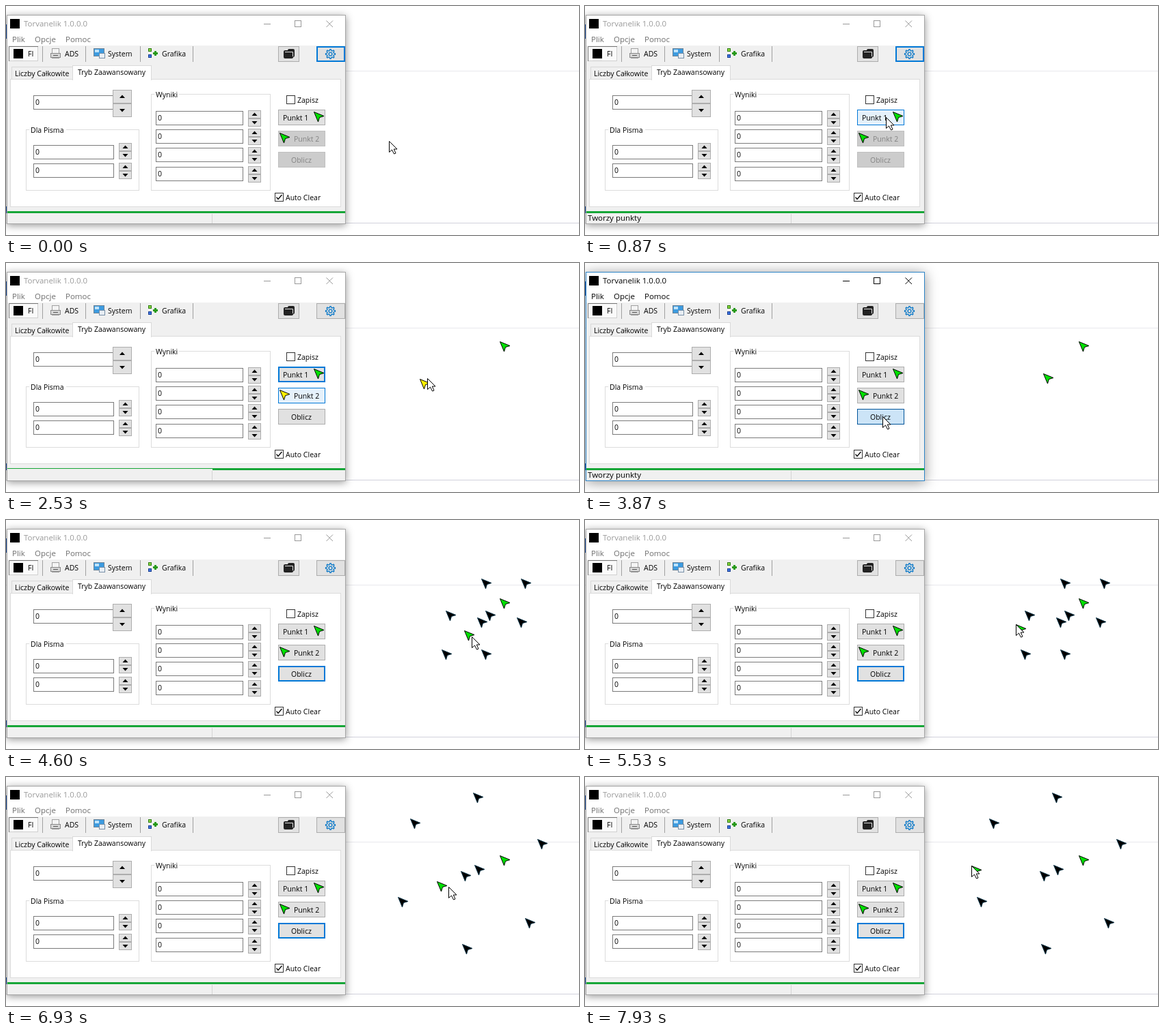
An HTML page with a canvas for the animation above (8 s loop, 838 by 336 pixels).

```html
<!DOCTYPE html>
<html lang="pl">
<head>
<meta charset="utf-8">
<style>
html, body { margin: 0; overflow: hidden; background: #fff; }
canvas { display: block; }
</style>
</head>
<body>
<canvas id="stage" width="838" height="336"></canvas>
<script>
const g = document.getElementById('stage').getContext('2d');
const LOOP = 8000, LAG = 35;
const BLUE = '#0078d7', GREEN = '#00e000', YELLOW = '#fff200', GREY = '#adadad';
const SMALL = '10.5px "Open Sans", "Noto Sans", sans-serif';
const LARGE = '11.5px "Open Sans", "Noto Sans", sans-serif';

// Places where the points are dropped, and when
const first = [722, 115], second = [670, 162], third = [630, 153], last = [565, 130];
const PICK1 = 930, DROP1 = 1470, PICK2 = 2130, DROP2 = 3200;
const PRESS1 = 3870, DONE1 = 4070, GRAB1 = 4800, LEAVE = 5800;
const PRESS2 = 6330, DONE2 = 6530, GRAB2 = 7130;

// Mouse moves: start, end, goal
const home = [560, 198];
const moves = [
  [0, 870, [440, 163]],
  [PICK1, 1400, first],
  [DROP1, 1730, [513, 156]],
  [1730, 2060, [430, 193]],
  [PICK2, 2890, second],
  [DROP2, 3730, [435, 225]],
  [DONE1, 4600, [681, 171]],
  [GRAB1, 5460, third],
  [LEAVE, 6270, [424, 226]],
  [DONE2, 6930, [647, 161]],
  [GRAB2, 7900, last]
];
const buttons = [
  { label: 'Punkt 1', x: 405, icon: [450, 155], from: 0 },
  { label: 'Punkt 2', x: 421, icon: [400, 186], from: DROP1 },
  { label: 'Oblicz', x: 417, from: PICK2 }
];
const styles = {
  off: ['#cccccc', '#bfbfbf', 1],
  normal: ['#e1e1e1', GREY, 1],
  focus: ['#e1e1e1', BLUE, 2],
  hover: ['#e5f1fb', BLUE, 1],
  press: ['#cce4f7', '#005499', 1]
};

const within = (t, ...spans) => spans.some(([a, b]) => t >= a && t < b);

function mouseAt(t) {
  let [x, y] = home;
  for (const [a, b, goal] of moves) {
    if (t < a) break;
    const left = 1 - Math.min(1, (t - a) / (b - a)), k = 1 - left * left;
    x += (goal[0] - x) * k;
    y += (goal[1] - y) * k;
  }
  return [Math.round(x), Math.round(y)];
}

function rect(x, y, w, h, color) {
  g.fillStyle = color;
  g.fillRect(x, y, w, h);
}

function box(x, y, w, h, fill, border, line = 1) {
  rect(x, y, w, h, border);
  rect(x + line, y + line, w - 2 * line, h - 2 * line, fill);
}

function text(str, x, y, color = '#000', font = SMALL) {
  g.font = font;
  g.fillStyle = color;
  g.fillText(str, x, y);
}

function poly(x, y, pts, fill, stroke) {
  g.beginPath();
  for (let i = 0; i < pts.length; i += 2) g.lineTo(x + pts[i], y + pts[i + 1]);
  g.closePath();
  g.fillStyle = fill;
  g.fill();
  if (stroke) {
    g.strokeStyle = stroke;
    g.lineWidth = 1;
    g.stroke();
  }
}

function line(color, width, ...pts) {
  g.strokeStyle = color;
  g.lineWidth = width;
  g.beginPath();
  for (let i = 0; i < pts.length; i += 2) g.lineTo(pts[i], pts[i + 1]);
  g.stroke();
}

function marker([x, y], fill, stroke = '#000') {
  poly(x + .5, y + .5, [0, 0, 14.5, 6, 8, 8, 6, 14.5], fill, stroke);
}

function pointer(x, y) {
  poly(x + .5, y + .5, [0, 0, 0, 16, 4, 12.5, 7, 18.5, 9.5, 17.5, 6.8, 11.5, 11.5, 11.5], '#fff', '#000');
}

function hand(x, y) {
  const pill = (dx, dy, w, h) => {
    g.beginPath();
    g.roundRect(x + dx + .5, y + dy + .5, w, h, 1.5);
    g.fill();
    g.stroke();
  };
  g.fillStyle = '#fff';
  g.strokeStyle = '#000';
  g.lineWidth = 1;
  pill(0, 11, 5, 6);
  pill(4, 13, 10, 9);
  for (let i = 0; i < 4; i++) pill(4 + 3 * i, i ? 5 + i : 0, 3, i ? 11 - i : 16);
  rect(x + 5, y + 14, 9, 6, '#fff');
}

function spin(x, y, w, h) {
  const half = h / 2;
  for (const s of [1, -1]) {
    const top = s > 0 ? y : y + half;
    box(x, top, w, half, '#e1e1e1', GREY);
    poly(x + w / 2, top + half / 2, [-4, 2 * s, 4, 2 * s, 0, -2.5 * s], '#000');
  }
}

function field(x, y, w) {
  box(x, y, w, 21, '#fff', '#7a7a7a');
  text('0', x + 3, y + 14);
}

function group(x, y, w, h, label, gap) {
  box(x, y, w, h, '#fff', '#dcdcdc');
  rect(x + 5, y, gap, 1, '#fff');
  text(label, x + 7, y + 5);
}

function check(x, y, label, on) {
  box(x, y, 13, 13, '#fff', '#333');
  if (on) line('#000', 1.3, x + 2.5, y + 6.5, x + 5, y + 9.5, x + 10.5, y + 3);
  text(label, x + 16, y + 11);
}

function gear(x, y) {
  g.strokeStyle = '#0a78c8';
  g.lineWidth = 1.3;
  g.beginPath();
  for (let i = 0; i < 32; i++) {
    const a = (i - .5) * Math.PI / 16, r = i % 4 < 2 ? 7 : 5;
    g.lineTo(x + r * Math.cos(a), y + r * Math.sin(a));
  }
  g.closePath();
  g.moveTo(x + 2.4, y);
  g.arc(x, y, 2.4, 0, 7);
  g.stroke();
}

function page() {
  rect(0, 0, 838, 336, '#fff');
  rect(0, 95, 838, 1, '#e8e8ec');
  rect(0, 318, 838, 1, '#d2d2dc');
  rect(0, 27, 1, 21, '#1750a8');
  rect(0, 294, 1, 10, '#1750a8');
}

function frameOf(active) {
  g.save();
  g.shadowColor = 'rgba(0,0,0,.42)';
  g.shadowBlur = active ? 18 : 11;
  g.shadowOffsetY = 2;
  rect(1, 13, 496, 307, '#999');
  g.restore();
  box(1, 13, 496, 307, '#f0f0f0', active ? '#2b83c6' : '#a6a6a6');
  rect(2, 14, 494, 44, '#fff');

  const ink = active ? '#000' : '#999', menu = active ? '#000' : '#6d6d6d';
  rect(6, 19, 14, 14, '#000');
  text('Torvanelik 1.0.0.0', 26, 30, ink, LARGE);
  rect(377, 26, 10, 1, ink);
  box(422, 21, 10, 10, '#fff', ink);
  line(ink, 1, 468.5, 21.5, 478, 31);
  line(ink, 1, 478, 21.5, 468.5, 31);
  text('Plik', 9, 53, menu, LARGE);
  text('Opcje', 42, 53, menu, LARGE);
  text('Pomoc', 87, 53, menu, LARGE);
}

function toolbar(focused) {
  box(4, 59, 43, 22, '#fafafa', '#d0d0d0');
  line('#777', 1, 4.5, 81, 4.5, 59.5, 47, 59.5);
  rect(11, 63, 14, 14, '#000');
  for (const x of [53, 116, 196, 273]) rect(x, 59, 1, 23, '#a0a0a0');
  text('FI', 32, 74);
  text('ADS', 86, 74);
  text('System', 149, 74);
  text('Grafika', 228, 74);
  // document
  box(67, 62, 11, 15, '#f4f4f4', '#a0a0a0');
  box(65, 69, 15, 7, '#d8d8d8', '#888');
  rect(69, 72, 7, 1, '#555');
  // monitor
  box(128, 62, 16, 12, '#3c9be0', '#6c8498');
  rect(130, 64, 6, 4, '#bfe3fa');
  box(136, 69, 9, 8, '#e8eef4', '#7890a8');
  // linked blocks
  box(208, 62, 5, 5, '#8ad43c', '#2c7c14');
  box(208, 71, 5, 5, '#3c74e0', '#183c90');
  rect(215, 68, 7, 3, '#2a9a1c');
  rect(217, 66, 3, 7, '#2a9a1c');

  box(398, 59, 31, 23, '#e1e1e1', GREY);
  g.fillStyle = '#222';
  g.beginPath();
  g.roundRect(406, 65, 14, 12, 2);
  g.roundRect(412, 63, 10, 12, 2);
  g.fill();
  line('#e1e1e1', 1, 408, 67.5, 419.5, 67.5, 419.5, 74);
  box(454, 59, 42, 23, '#e1e1e1', focused ? BLUE : GREY, focused ? 2 : 1);
  gear(474.5, 70.5);
}

function form() {
  box(8, 89, 90, 19, '#f0f0f0', '#d9d9d9');
  box(6, 107, 484, 188, '#fff', '#dcdcdc');
  box(97, 87, 116, 22, '#fff', '#d9d9d9');
  rect(98, 107, 114, 2, '#fff');
  text('Liczby Całkowite', 13, 103);
  text('Tryb Zaawansowany', 105, 101);

  field(40, 131, 117);
  spin(156, 123, 28, 40);
  group(29, 181, 166, 90, 'Dla Pisma', 54);
  for (let i = 0; i < 2; i++) {
    field(40, 204 + 27 * i, 118);
    spin(165, 201 + 29 * i, 19, 24);
  }
  group(212, 129, 175, 142, 'Wyniki', 36);
  for (let i = 0; i < 4; i++) {
    const y = 154 + Math.floor(27.4 * i);
    field(219, y, 128);
    spin(354, y - 1, 19, 24);
  }
  check(410, 131, 'Zapisz', false);
  check(393, 274, 'Auto Clear', true);
}

function pushButton(b, y, state, color) {
  box(398, y, 69, 23, ...styles[state]);
  text(b.label, b.x, y + 16, state === 'off' ? '#838383' : '#000');
  if (b.icon) marker(b.icon, color);
}

// Eight marks around the middle of the two chosen points
function results(p, q, spread) {
  const vx = p[0] - q[0], vy = p[1] - q[1];
  const mx = (p[0] + q[0]) / 2 - 1, my = (p[1] + q[1]) / 2 - .4;
  for (const side of [-.5, .5])
    for (const sign of [-1, 1])
      for (const [along, across] of [[.61, 0], [0, spread]]) {
        const a = side + sign * along, b = sign * across;
        marker([Math.round(mx + a * vx - b * vy), Math.round(my + a * vy + b * vx)], '#000', '#0b3346');
      }
}

function draw(t) {
  const [mx, my] = mouseAt(t);
  const active = within(t, [DROP1, PICK2], [DROP2, 4600], [PRESS2, 6930]);
  const pick = within(t, [PICK1, DROP1]) ? 0 : within(t, [PICK2, DROP2]) ? 1 : -1;
  const focus = [DROP1, DROP2, PRESS1].filter(s => t >= s).length - 1;
  const press = within(t, [PRESS1, DONE1], [PRESS2, DONE2]);
  const drag = pick >= 0 || within(t, [GRAB1, LEAVE], [GRAB2, LOOP]);
  const trail = start => mouseAt(Math.max(start, t - LAG));

  page();
  frameOf(active);
  toolbar(focus < 0);
  form();

  let hint = false;
  buttons.forEach((b, i) => {
    const y = 152 + 31 * i;
    const over = !drag && mx >= 398 && mx < 467 && my >= y && my < y + 23;
    let state = i === focus ? 'focus' : 'normal';
    if (t < b.from) state = 'off';
    else if (i === 2 && press) state = 'press';
    else if (over || i === pick) state = 'hover';
    if (over && state !== 'off') hint = true;
    pushButton(b, y, state, i === pick ? YELLOW : GREEN);
  });

  rect(2, 301, 494, pick < 0 ? 3 : 1, '#16a637');
  if (pick >= 0) rect(302, 301, 194, 3, '#16a637');
  rect(301, 305, 1, 14, '#d4d4d4');
  if (hint) text('Tworzy punkty', 4, 315, '#000', LARGE);

  if (t >= DONE2) results(first, third, 1);
  else if (t >= DONE1) results(first, second, .548);

  if (t >= PICK1) marker(t < DROP1 ? trail(PICK1) : first, pick === 0 ? YELLOW : GREEN);
  if (t >= PICK2) {
    const place = drag ? trail(t < DROP2 ? PICK2 : t < LEAVE ? GRAB1 : GRAB2) : t < GRAB1 ? second : third;
    marker(place, pick === 1 ? YELLOW : GREEN);
  }

  // The page has a link beside the window
  if (!drag && mx > 500 && mx < 545 && my < 175) hand(mx, my - 1);
  else pointer(mx, my);
}

function tick() {
  draw(performance.now() % LOOP);
  requestAnimationFrame(tick);
}
tick();
</script>
</body>
</html>
```
